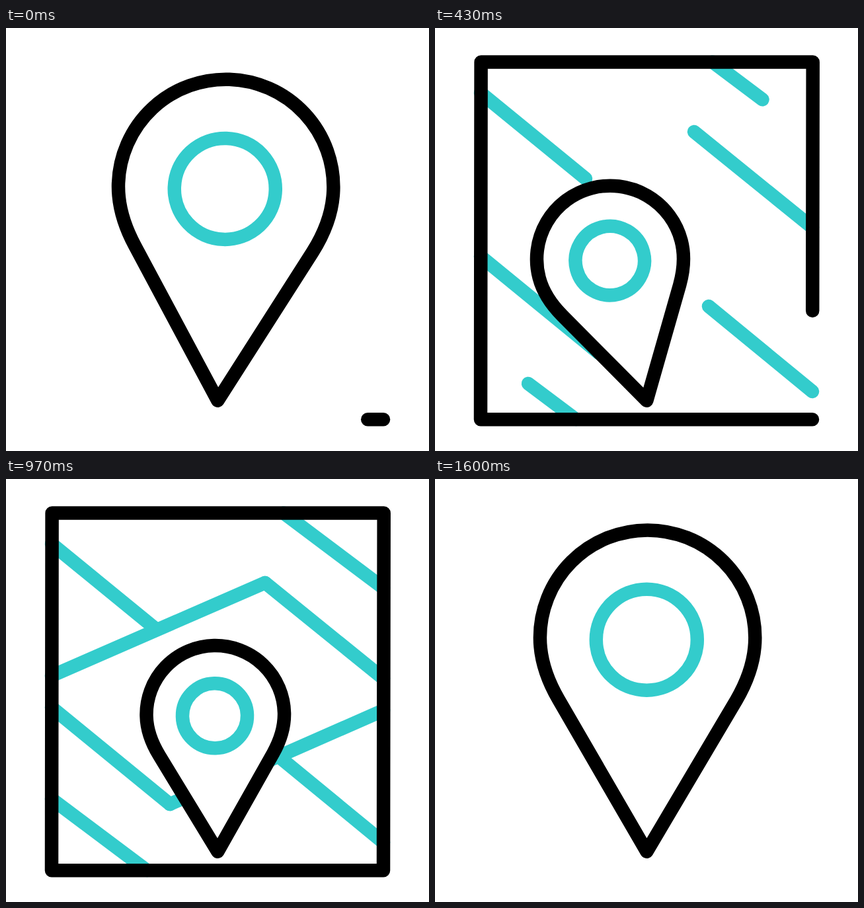
These frames come from a looping animation (640 px wide and 640 px high, 1.67 s). An HTML page:

```html
<!DOCTYPE html>
<html lang="en">
<head>
<meta charset="utf-8">
<title>Map pin</title>
<style>
  html, body { margin: 0; width: 100%; height: 100%; overflow: hidden; background: #fff; }
  svg { display: block; width: 100vw; height: 100vh; }
  path, circle { fill: none; stroke: #000; stroke-width: 20.5; stroke-linecap: round; stroke-linejoin: round; }
  .road, circle { stroke: #3cc; }
  #body { fill: #fff; }
  #pin * { vector-effect: non-scaling-stroke; }
</style>
</head>
<body>
<svg viewBox="0 0 640 640">
  <g id="map"></g>
  <g id="pin">
    <path id="body" d="M0 0L-133.2 -229.8C-150.1 -258.8 -161.4 -290 -161.4 -323.6A162.7 162.7 0 0 1 164 -323.6C164 -290 152.7 -258.4 135.8 -229.4Z"/>
    <circle cx="0" cy="-320.5" r="76.5"/>
  </g>
</svg>
<script>
const LOOP = 1670, FRAME = 100 / 3, LAST = 48;
const map = document.getElementById('map');
const pin = document.getElementById('pin');

// Each stroke: path, draw start and end, erase start and end (in frames).
const strokes = [
  ['M69 98L228 228', 3.2, 9.2, 37.2, 43],
  ['M571 550L414 421', 3.2, 9.2, 37.2, 43],
  ['M392 157L571 302', 5.8, 11.8, 33.3, 39.3],
  ['M248 492L69 345.5', 5.8, 11.8, 33.3, 39.3],
  ['M420 51.5L571 165', 10, 16, 32, 37],
  ['M213 592L69 484', 10, 16, 32, 37],
  ['M392 157L69 297.8', 13.2, 18.8, 31, 36.5],
  ['M248 492L571 350', 13.2, 18.8, 31, 36.5],
  ['M571 592.2L69 592.2L69.6 51.4L571.7 51.4Z', -1.07, 15.93, 38, 48]
].map(([d, ...keys], i, all) => {
  const el = document.createElementNS('http://www.w3.org/2000/svg', 'path');
  el.setAttribute('d', d);
  if (i < all.length - 1) el.setAttribute('class', 'road');
  map.appendChild(el);
  return { el, keys, len: el.getTotalLength() };
});

// Swing of the pin: [frame, degrees]
const swing = [[-1.15, 0], [5.6, 25.4], [15, -20], [22.7, 15], [33.2, -10], [40.8, 5], [48, 0]];

function ease(f, from, to) {
  const x = Math.min(1, Math.max(0, (f - from) / (to - from)));
  return x * x * (3 - 2 * x);
}

function angleAt(f) {
  let a = swing[0][1];
  for (let i = 1; i < swing.length; i++) {
    const [f0, a0] = swing[i - 1], [f1, a1] = swing[i];
    a += (a1 - a0) * ease(f, f0, f1);
  }
  return a;
}

function draw(now) {
  const f = Math.min(LAST, Math.floor((now % LOOP + 4) / FRAME));
  for (const { el, keys: [a, b, c, d], len } of strokes) {
    const part = ease(f, a, b) - ease(f, c, d);
    el.style.display = part > 0.0005 ? '' : 'none';
    el.style.strokeDasharray = part > 0.9995 ? 'none' : `${part * len} ${len * 2}`;
  }
  const scale = 1 - 0.359 * (ease(f, 5.6, 15) - ease(f, 38, 48));
  pin.setAttribute('transform', `translate(320.3 563.7) rotate(${angleAt(f)}) scale(${scale})`);
}

let start;
function tick(now) {
  start ??= now;
  draw(Math.max(0, now - start));
  requestAnimationFrame(tick);
}
draw(0);
requestAnimationFrame(tick);
</script>
</body>
</html>
```
